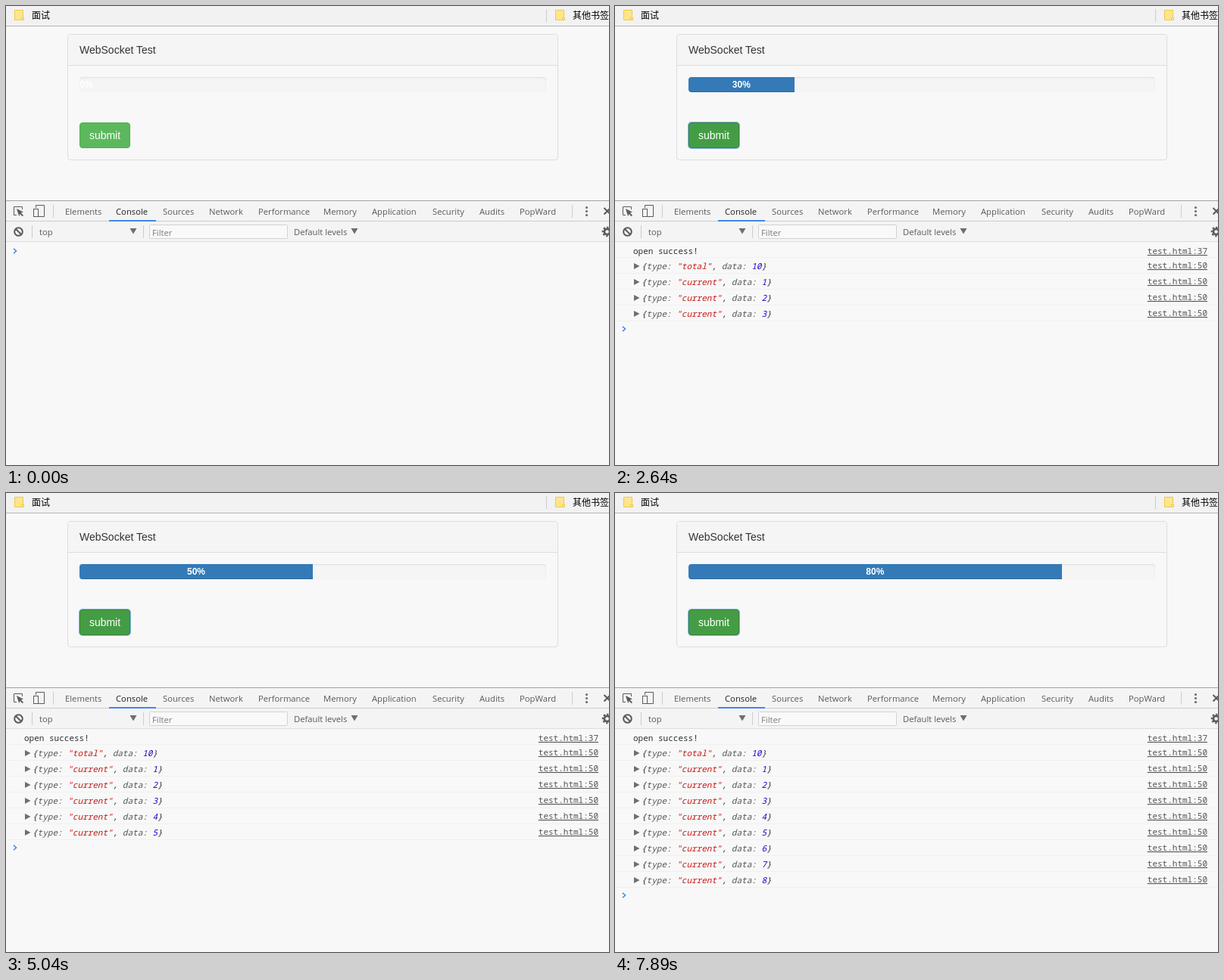
An HTML page that plays this animation: 796x607 px, repeating every 8 s.

```html
<!DOCTYPE html>
<html lang="zh">
<head>
<meta charset="utf-8">
<title>WebSocket Test</title>
<style>
html, body { margin: 0; width: 100%; height: 100%; overflow: hidden; background: #f8f8f8; }
div, button, svg { position: absolute; box-sizing: border-box; }
svg { left: 0; top: 0; }
.page { font: 14px "Liberation Sans", Arial, sans-serif; color: #333; }
.panel { left: 81px; top: 37px; width: 648px; height: 167px; border: 1px solid #ddd; border-radius: 4px; }
.heading { left: 0; top: 0; width: 646px; height: 41px; padding-left: 15px; line-height: 40px;
  background: #f5f5f5; border-bottom: 1px solid #ddd; border-radius: 3px 3px 0 0; }
.track { left: 97px; top: 94px; width: 616px; height: 20px; overflow: hidden; background: #f5f5f5;
  border-radius: 4px; box-shadow: inset 0 1px 2px rgba(0,0,0,.1); }
.bar { left: 0; top: 0; height: 20px; background: #337ab7; color: #fff; font-size: 12px; font-weight: bold;
  line-height: 20px; text-align: center; white-space: nowrap; box-shadow: inset 0 -1px 0 rgba(0,0,0,.15); }
.submit { left: 97px; top: 154px; width: 67px; height: 34px; padding: 0; font: inherit; color: #fff;
  background: #5cb85c; border: 1px solid #4cae4c; border-radius: 4px; outline: none; }
.hover { background: #449d44; border-color: #398439; }
.focus { box-shadow: 0 0 0 1px #86b7ee; }
.pressed { background: #398439; border-color: #255625; box-shadow: inset 0 3px 5px rgba(0,0,0,.125), 0 0 0 1px #86b7ee; }
.cjk { font: 12px "Noto Sans CJK SC", "Noto Sans CJK", sans-serif; fill: #000; }
.ui { font: 11.25px "Open Sans", sans-serif; fill: #5a5a5a; }
.mono { font: 11px "Noto Sans Mono", monospace; fill: #303030; white-space: pre; }
.object { font-style: italic; }
.key { fill: #565656; }
.string { fill: #c41a16; }
.number { fill: #1c00cf; }
.link { text-anchor: end; text-decoration: underline; fill: #545454; }
.line { stroke: #f0f0f0; }
.sep { stroke: #ccc; }
.icon { fill: none; stroke: #5a5a5a; }
.solid { fill: #6e6e6e; }
</style>
</head>
<body>
<svg width="796" height="607" viewBox="0 0 796 607">
  <defs>
    <g id="folder">
      <path d="M.5 .5H11.5V10.5H12.5V13.5H.5Z" fill="#ffe68c" stroke="#efc94c"/>
      <path d="M9.5 13V10.5H12" fill="none" stroke="#efc94c"/>
    </g>
  </defs>

  <rect width="796" height="26" fill="#f2f2f2"/>
  <path d="M0 26.5H796" stroke="#b6b6b6"/>
  <use href="#folder" x="11" y="5"/>
  <use href="#folder" x="725" y="5"/>
  <path class="sep" d="M713.5 4V21"/>
  <text class="cjk" x="34" y="17">面试</text>
  <text class="cjk" x="748" y="17">其他书签</text>

  <rect y="258" width="796" height="53" fill="#f4f4f4"/>
  <path d="M0 257.5H796" stroke="#a3a3a3"/>
  <path class="sep" d="M0 284.5H796M62.5 263V280M747.5 263V280M34.5 290V307M181.5 290V307"/>
  <path d="M0 311.5H796" stroke="#ddd"/>
  <rect x="136" y="283" width="62" height="2" fill="#4285f4"/>

  <path class="icon" d="M14 276.5H10.5V265.5H21.5V269"/>
  <path d="M14 268L23 272.5L19.8 273.6L23 277L21.8 278.2L18.5 275L17.2 278Z" fill="#5a5a5a"/>
  <path class="icon" d="M39.5 267V263.5H50.5V278.5H43"/>
  <rect class="icon" x="36.5" y="268.5" width="6" height="10"/>
  <g class="solid">
    <circle cx="766.5" cy="266.5" r="1.6"/>
    <circle cx="766.5" cy="271.5" r="1.6"/>
    <circle cx="766.5" cy="276.5" r="1.6"/>
    <path d="M163.500 294H172.500L168 301.500ZM455.500 294H464.500L460 301.500Z"/>
  </g>
  <path class="icon" stroke-width="2" d="M789.500 267L798 275.500M789.500 275.500L798 267"/>
  <g class="icon" stroke-width="2">
    <circle cx="16.500" cy="298.500" r="5.300"/>
    <path d="M12.700 294.700L20.300 302.300"/>
    <circle cx="793.500" cy="298.500" r="3.700" stroke-width="2.800"/>
    <circle cx="793.500" cy="298.500" r="5.800" stroke-dasharray="2.500 2.055" stroke-dashoffset="1.250"/>
  </g>

  <g class="ui" id="tabs"></g>
  <rect x="189.500" y="289.500" width="182" height="18" rx="1" fill="#f9f9f9" stroke="#d2d2d2"/>
  <text class="ui" x="44" y="303">top</text>
  <text class="ui" x="193" y="304" style="fill:#7c7c7c">Filter</text>
  <text class="ui" x="380" y="303">Default levels</text>

  <g class="mono" id="log"></g>
  <path id="prompt" d="M10 320.800L13.500 324L10 327.200" fill="none" stroke="#3b82f0" stroke-width="1.500"/>
</svg>

<div class="page">
  <div class="panel"><div class="heading">WebSocket Test</div></div>
  <div class="track"><div class="bar" id="bar">0%</div></div>
  <button class="submit" id="submit">submit</button>
</div>

<script>
const LOOP = 8000, HOVER = 300, PRESS = 510, OPEN = 600;
const INTERVAL = 960, BAR_LAG = 8, BAR_TIME = 600;
const $ = id => document.getElementById(id);

const tabs = { Elements: 78, Console: 145, Sources: 207, Network: 268, Performance: 333, Memory: 419,
  Application: 483, Security: 563, Audits: 625, PopWard: 678 };
$('tabs').innerHTML = Object.entries(tabs).map(([name, x]) =>
  `<text x="${x}" y="276"${name === 'Console' ? ' fill="#222" style="fill:#222"' : ''}>${name}</text>`).join('');

const link = (y, line) => `<text class="link" x="782" y="${y}">test.html:${line}</text>`;
const rule = y => `<path class="line" d="M0 ${y}.5H796"/>`;

function messageRow(index) {
  const y = 348 + 21 * index;
  const [type, data] = index ? ['current', index] : ['total', 10];
  return `<g><path class="solid" d="M25 ${y - 8}L32.500 ${y - 4}L25 ${y}Z"/>
    <text class="object" x="35" y="${y}">{<tspan class="key">type:</tspan> <tspan class="string">"${type}"</tspan>, `
    + `<tspan class="key">data:</tspan> <tspan class="number">${data}</tspan>}</text>
    ${link(y - 1, 50)}${rule(y + 5)}</g>`;
}

$('log').innerHTML = `<g><text x="24" y="328">open success!</text>${link(328, 37)}${rule(332)}</g>`
  + Array.from({ length: 9 }, (_, i) => messageRow(i)).join('');
const rows = [...$('log').children];

// CSS "ease": cubic-bezier(.25, .1, .25, 1), solved by bisection
function ease(x) {
  if (x <= 0) return 0;
  if (x >= 1) return 1;
  const bezier = (s, a, b) => 3 * s * (1 - s) ** 2 * a + 3 * s * s * (1 - s) * b + s ** 3;
  let low = 0, high = 1;
  for (let i = 0; i < 24; i++) {
    const mid = (low + high) / 2;
    if (bezier(mid, .25, .25) < x) low = mid; else high = mid;
  }
  return bezier(low, .1, 1);
}

function buttonState(t) {
  if (t < HOVER) return '';
  if (t < PRESS) return 'hover';
  return t < OPEN ? 'pressed' : 'hover focus';
}

function render(t) {
  const count = t < OPEN ? 0 : Math.floor((t - OPEN) / INTERVAL) + 1;
  const sinceMessage = t - OPEN - (count - 1) * INTERVAL - BAR_LAG;
  const progress = count ? count - 1 + ease(sinceMessage / BAR_TIME) : 0;
  $('bar').style.width = progress * 10 + '%';
  $('bar').textContent = count ? count * 10 + '%' : '0%';
  $('submit').className = 'submit ' + buttonState(t);
  rows.forEach((row, i) => row.style.display = count && i < count + 2 ? '' : 'none');
  $('prompt').setAttribute('transform', `translate(0 ${count ? 40 + 21 * count : 0})`);
}

function tick() {
  render(performance.now() % LOOP);
  requestAnimationFrame(tick);
}
tick();
</script>
</body>
</html>
```
